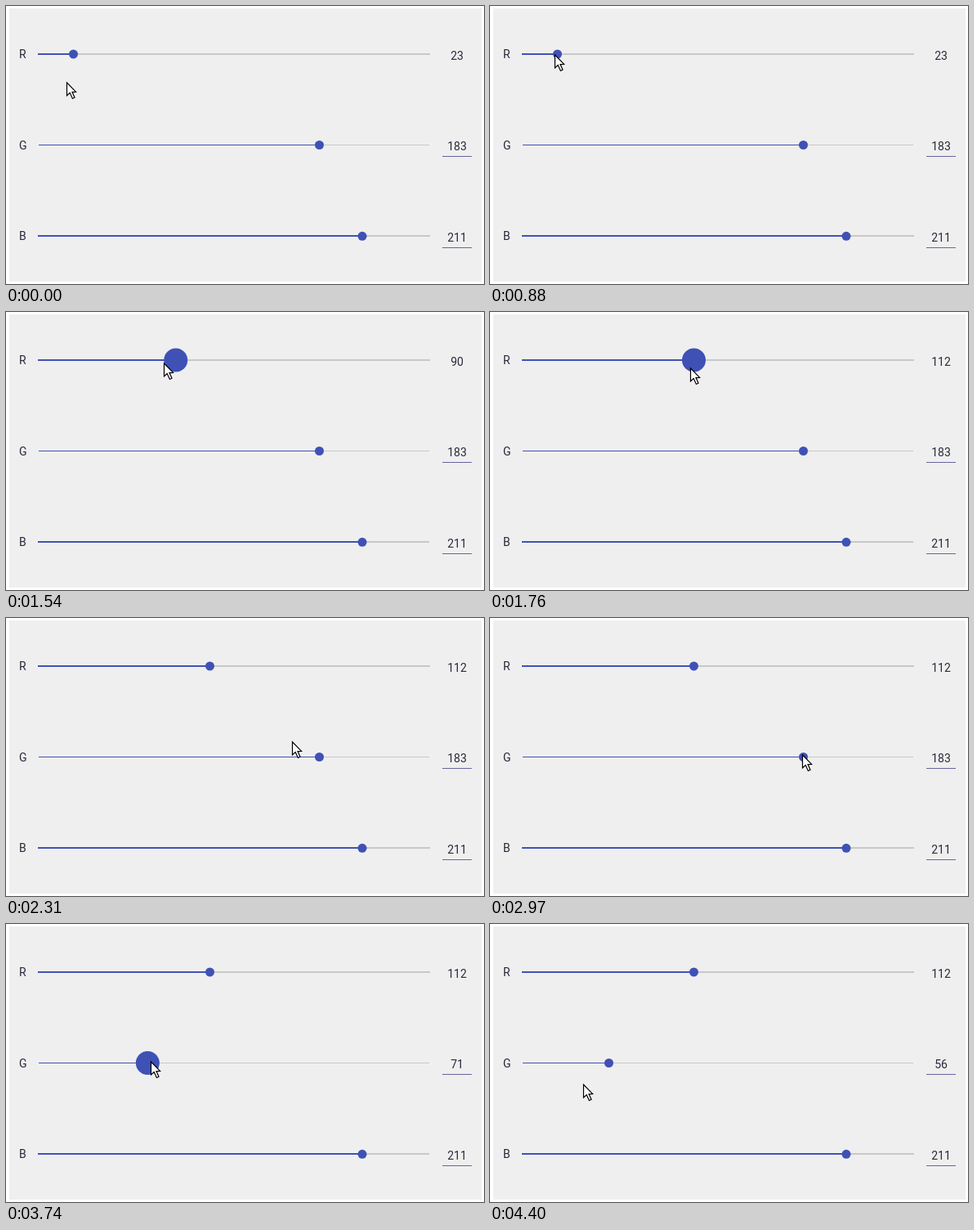
An HTML page with a canvas that plays this animation: 585x341 px, repeating every 4.51 s.

```html
<!DOCTYPE html>
<html lang="en">
<head>
<meta charset="utf-8">
<title>RGB sliders</title>
<style>
html, body { margin: 0; width: 100%; height: 100%; overflow: hidden; background: #fff; }
canvas { display: block; width: 585px; height: 341px; }
</style>
</head>
<body>
<canvas id="stage" width="585" height="341"></canvas>
<script>
const ctx = document.getElementById('stage').getContext('2d', { alpha: false });
const LOOP = 4510, STEP = 110;
const BLUE = '#3f51b5', GREY = '#c8c8c8', INK = '#282a3a';
const SMALL = 5.5, BIG = 14.5;

// Stops of the pointer: step, x, y
const stops = [
  [1, 74, 94], [8, 79, 60], [12, 125, 56], [16, 245, 69], [17, 245, 69], [22, 366, 163],
  [27, 382, 168], [31, 273, 170], [36, 144, 167], [37, 144, 166], [40, 114, 197]
];

const ramp = (s, a, b) => Math.min(1, Math.max(0, (s - a) / (b - a)));
const glide = (s, a, b, from, to) => from + (to - from) * (1 - Math.cos(Math.PI * ramp(s, a, b))) / 2;
const pulse = (s, down, up) => SMALL + (BIG - SMALL) * (ramp(s, down, down + 2) - ramp(s, up, up + 2));

// Smooth curve through the stops that never overshoots them.
function slope(i, c) {
  const a = stops[i], b = stops[i + 1];
  return a && b ? (b[c] - a[c]) / (b[0] - a[0]) : 0;
}

function tangent(i, c) {
  const m = slope(i - 1, c), n = slope(i, c);
  return m * n > 0 ? 2 * m * n / (m + n) : 0;
}

function pointerAt(s, c) {
  if (s <= stops[0][0]) return stops[0][c];
  const i = stops.findIndex(p => p[0] >= s) - 1;
  const a = stops[i], b = stops[i + 1], h = b[0] - a[0], k = (s - a[0]) / h;
  const e = k * k * (3 - 2 * k);
  return a[c] + (b[c] - a[c]) * e
    + h * k * (1 - k) * ((1 - k) * tangent(i, c) - k * tangent(i + 1, c));
}

function rect(color, x, y, w, h) {
  ctx.fillStyle = color;
  ctx.fillRect(x, y, w, h);
}

function text(str, x, y, align) {
  ctx.font = '14px Roboto, sans-serif';
  ctx.textAlign = align;
  ctx.fillStyle = INK;
  ctx.fillText(str, x, y);
}

function slider(o) {
  rect(GREY, o.left, o.y, o.right - o.left, o.line);
  rect(BLUE, o.left, o.y, o.x - o.left, o.line);
  ctx.fillStyle = BLUE;
  ctx.beginPath();
  ctx.arc(o.x, o.cy, o.r, 0, Math.PI * 2);
  ctx.fill();
  text(o.name, 16, o.base, 'left');
  text(o.value, 552, o.base + o.drop, 'center');
  if (o.under) rect('#6764a0', 534, o.under, 36, 1);
}

function arrow(x, y) {
  ctx.beginPath();
  ctx.moveTo(x + .5, y);
  ctx.lineTo(x + .5, y + 16);
  ctx.lineTo(x + 4.2, y + 12.6);
  ctx.lineTo(x + 7.4, y + 19.5);
  ctx.lineTo(x + 10, y + 18.3);
  ctx.lineTo(x + 7, y + 11.6);
  ctx.lineTo(x + 11.6, y + 11.4);
  ctx.closePath();
  ctx.fillStyle = '#fff';
  ctx.fill();
  ctx.strokeStyle = '#000';
  ctx.lineWidth = 1.2;
  ctx.stroke();
}

function draw(ms) {
  const s = Math.floor(ms / STEP);
  const rx = glide(s, 10, 16, 82.5, 249.5), rr = pulse(s, 8, 17);
  const gx = glide(s, 27, 36, 383.5, 145.5), gr = pulse(s, 27, 35);
  const dragging = rr > SMALL || gr > SMALL;

  rect('#fff', 0, 0, 585, 341);
  rect('#efefef', 4, 3, 578, 335);
  slider({ name: 'R', left: 39, right: 519, y: 58, line: 2, cy: 59, x: rx, r: rr,
    base: 64, drop: 2, value: Math.round((rx - 38.5) / 480 * 255) });
  slider({ name: 'G', left: 40, right: 518, y: 170, line: 1, cy: 170.5, x: gx, r: gr,
    base: 176, drop: 1, value: Math.round((gx - 40) / 478 * 255), under: 184 });
  slider({ name: 'B', left: 39, right: dragging ? 518 : 519, y: 281, line: 2, cy: 282.3, x: 436,
    r: SMALL, base: 287, drop: 2, value: 211, under: 296 });
  arrow(Math.round(pointerAt(s, 1)), Math.round(pointerAt(s, 2)));
}

const start = performance.now();
function tick() {
  draw((performance.now() - start) % LOOP);
  requestAnimationFrame(tick);
}
tick();
</script>
</body>
</html>
```
